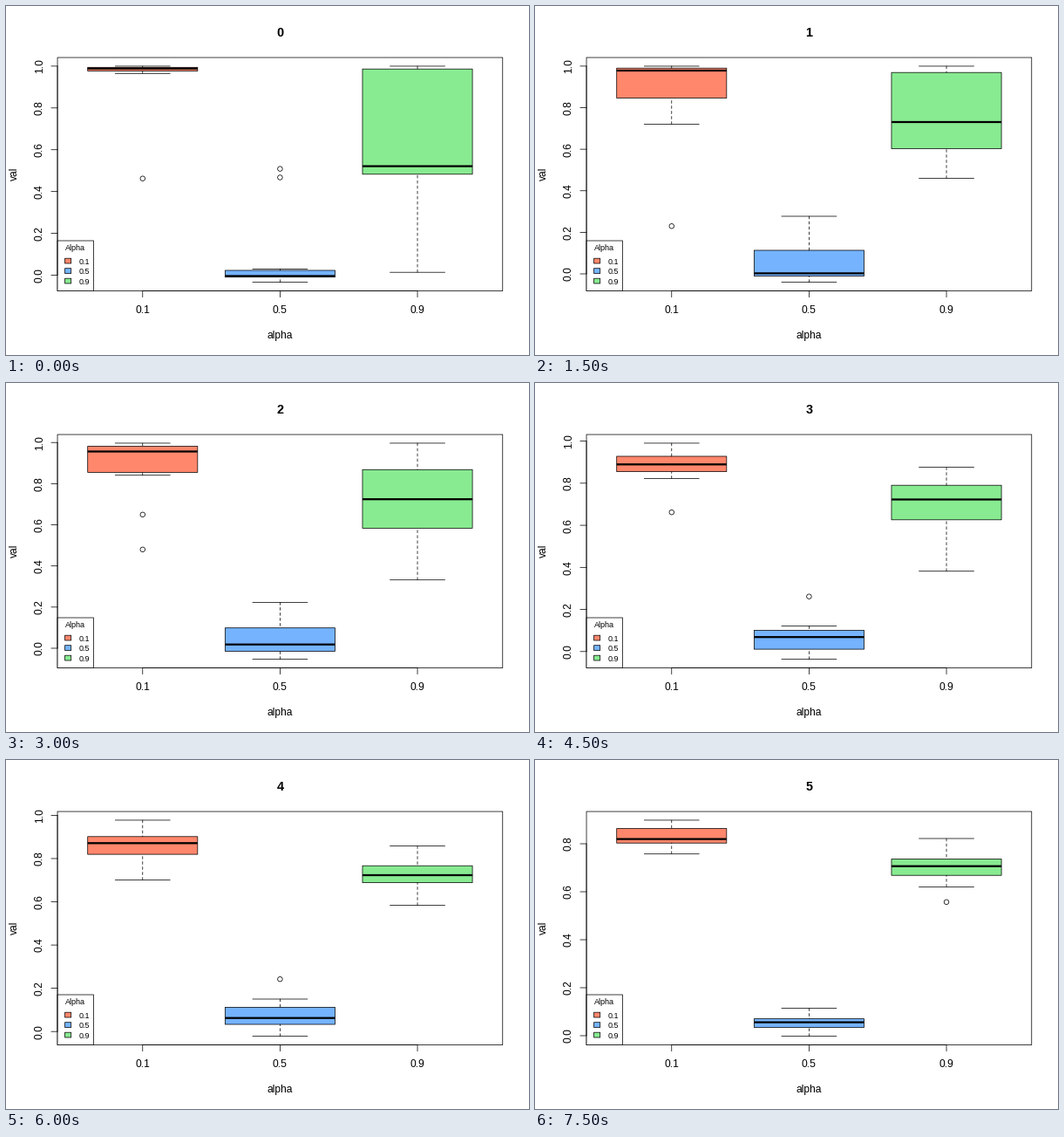
Animation, 600 px wide and 400 px high, one loop 8000 ms. Source, as a matplotlib script:

```python
import matplotlib.pyplot as plt
from matplotlib.animation import FuncAnimation
from matplotlib.patches import Circle, Rectangle

W, H, DPI = 600, 400, 100
PX = 72 / DPI                      # one pixel in points
THIN, THICK = 0.75 * PX, 2.25 * PX
FONT = "Liberation Sans"

LEFT, RIGHT, TOP, BOTTOM = 59.04, 569.76, 59.04, 326.56
MID_X, MID_Y = (LEFT + RIGHT) / 2, (TOP + BOTTOM) / 2
UNIT_X = (RIGHT - LEFT) / 3.24
HI, LO = 68.95, 316.65             # rows of the largest and smallest value

COLORS = ["#FF876C", "#75B3FF", "#88EB91"]
LABELS = ["0.1", "0.5", "0.9"]

# Per step: row of 0, pixels per unit, then for each group
# (whisker top, upper quartile, median, lower quartile, whisker end, outliers)
STEPS = [
    (308.5, 239.6, [(HI, 70.3, 71.7, 74.5, 77.3, [197.7]),
                    (301.5, 303, 309.5, 310.7, LO, [186.6, 196.5]),
                    (HI, 72.2, 183.6, 192.8, 305.2, [])]),
    (307.0, 238.1, [(HI, 71.2, 74, 105.5, 135.5, [252.3]),
                    (241, 280, 306.4, 309.5, LO, []),
                    (HI, 76.2, 133, 163.5, 197.5, [])]),
    (304.0, 235.8, [(HI, 72.5, 78.5, 102.4, 105.7, [150.8, 190.8]),
                    (251.4, 280.7, 299.7, 307.4, LO, []),
                    (HI, 99.3, 133.2, 166.4, 225.7, [])]),
    (307.8, 241.2, [(HI, 84, 93.3, 101.6, 109.5, [148.2]),
                    (278.6, 283.4, 291.2, 305.1, LO, [244.7]),
                    (96.6, 117.2, 133.5, 156.8, 215.7, [])]),
    (311.2, 247.8, [(HI, 87.8, 95.3, 108.1, 137.5, []),
                    (274, 283.4, 295.7, 303, LO, [251.2]),
                    (98.5, 121.2, 132, 140.6, 166.5, [])]),
    (316.0, 275.0, [(HI, 78.5, 90.6, 95.2, 107.7, []),
                    (284.5, 296.6, 300.6, 306.5, LO, []),
                    (90, 113.5, 121.7, 132.2, 145.4, [162.8])]),
]

INTERVAL, HOLD = 500, 3            # each step stays for HOLD frames
FRAMES = 16

fig = plt.figure(figsize=(W / DPI, H / DPI), dpi=DPI, facecolor="white")
ax = fig.add_axes([0, 0, 1, 1])


def line(x0, y0, x1, y1, lw=THIN, cap="round", **kw):
    ax.plot([x0, x1], [y0, y1], color="black", lw=lw, snap=False,
            solid_capstyle=cap, dash_capstyle="round", **kw)


def rect(x0, y0, x1, y1, fill="none"):
    ax.add_patch(Rectangle((x0, y0), x1 - x0, y1 - y0, facecolor=fill,
                           edgecolor="black", lw=THIN, snap=False,
                           joinstyle="round"))


def text(x, y, s, size=12, ha="center", rot=0, weight="normal"):
    ax.text(x, y, s, fontname=FONT, fontsize=size * PX, ha=ha, va="baseline",
            rotation=rot, rotation_mode="anchor", fontweight=weight)


def box(x, stats, color):
    top, q3, med, q1, end, outliers = stats
    half, staple = 0.4 * UNIT_X, 0.2 * UNIT_X
    rect(x - half, q3, x + half, q1, color)
    line(x - half, med, x + half, med, THICK, "butt")
    for y, q in ((end, q1), (top, q3)):
        line(x, y, x, q, ls=(0, (4, 4)))
        line(x - staple, y, x + staple, y)
    for y in outliers:
        ax.add_patch(Circle((x, y), 2.75, facecolor="none",
                            edgecolor="black", lw=THIN, snap=False))


def axes(zero, unit):
    rect(LEFT, TOP, RIGHT, BOTTOM)
    rows = [(k / 5, zero - unit * k / 5) for k in range(6)]
    rows = [(v, y) for v, y in rows if y > TOP]
    line(LEFT, rows[0][1], LEFT, rows[-1][1])
    for v, y in rows:
        line(LEFT, y, LEFT - 7.2, y)
        text(41.76, y, f"{v:.1f}", rot=90)
    xs = [LEFT + (k + 0.62) * UNIT_X for k in range(3)]
    line(xs[0], BOTTOM, xs[-1], BOTTOM)
    for x, s in zip(xs, LABELS):
        line(x, BOTTOM, x, BOTTOM + 7.2)
        text(x, 352.5, s)
    text(MID_X, 381.3, "alpha")
    text(12.96, MID_Y, "val", rot=90)
    return xs


def legend():
    rect(LEFT, 269, 100.5, BOTTOM, "white")
    text(79.7, 280, "Alpha", 9)
    for k, (color, s) in enumerate(zip(COLORS, LABELS)):
        y = 292.1 + 11.5 * k
        rect(67.6, y - 2.9, 74.7, y + 2.9, color)
        text(83.3, y + 3.8, s, 9, "left")


def draw(i):
    ax.clear()
    ax.set(xlim=(0, W), ylim=(H, 0))
    ax.axis("off")
    step = i // HOLD
    zero, unit, groups = STEPS[step]
    xs = axes(zero, unit)
    for x, stats, color in zip(xs, groups, COLORS):
        box(x, stats, color)
    text(MID_X, 34.9, str(step), 14.4, weight="bold")
    legend()
    return []


anim = FuncAnimation(fig, draw, frames=FRAMES, interval=INTERVAL,
                     init_func=lambda: [], repeat=True, repeat_delay=0)
plt.show()
```
